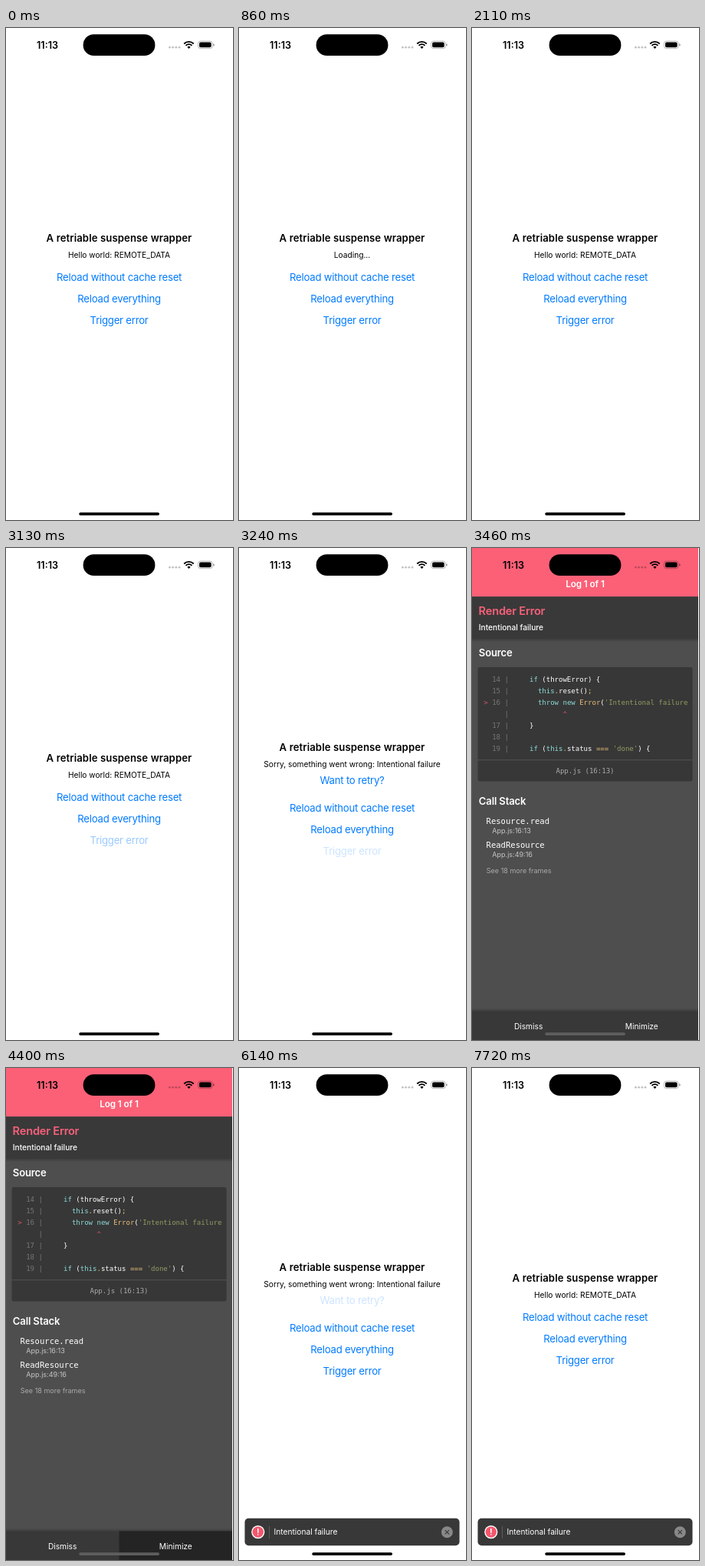
An HTML page that plays this animation: 296x640 px, repeating every 8 s.

```html
<!DOCTYPE html>
<html lang="en">
<head>
<meta charset="utf-8">
<title>Retriable suspense</title>
<style>
  html, body { margin: 0; width: 100%; height: 100%; overflow: hidden; background: #fff; }
  svg { display: block; width: 100vw; height: 100vh; }
  text { font-family: Inter, "Noto Sans", sans-serif; white-space: pre; }
  .mid { text-anchor: middle; }
  .title { font-size: 13.14px; font-weight: 600; letter-spacing: .008em; }
  .body { font-size: 10.2px; }
  .button { font-size: 13.14px; letter-spacing: -.016em; fill: #007aff; }
  .clock { font-size: 12.6px; font-weight: 600; }
  .white { fill: #fff; }
  .heading { font-size: 13.1px; font-weight: 600; letter-spacing: -.012em; }
  .small { font-size: 9.03px; fill: #c4c4c4; }
  .mono { font-family: "DejaVu Sans Mono", monospace; font-size: 9.03px; }
  .frame { font-size: 10.54px; }
  .key { fill: #8cdcd8; }
  .cap, .op { fill: #eac179; }
  .str { fill: #909d62; }
  .gutter { fill: #767676; }
  .mark { fill: #dc5668; }
</style>
</head>
<body>
<svg viewBox="0 0 296 640" preserveAspectRatio="none">
  <defs>
    <linearGradient id="shade" x2="0" y2="1">
      <stop stop-color="#000" stop-opacity=".2"/>
      <stop offset="1" stop-color="#000" stop-opacity="0"/>
    </linearGradient>
    <clipPath id="codeClip"><rect x="8" y="155" width="273" height="120"/></clipPath>
  </defs>

  <g id="app">
    <g id="head">
      <text class="title mid" x="147.5" y="278">A retriable suspense wrapper</text>
      <text class="body mid" id="message" x="147.5" y="298.8"></text>
    </g>
    <text class="button mid" id="retry" x="147.6" y="306.6">Want to retry?</text>
    <g id="buttons">
      <text class="button mid" x="147.6" y="328.7">Reload without cache reset</text>
      <text class="button mid" id="reload" x="147.6" y="356.9">Reload everything</text>
      <text class="button mid" id="trigger" x="147.6" y="385.1">Trigger error</text>
    </g>
    <g id="toast">
      <rect x="7.5" y="585.8" width="280" height="35.4" rx="5" fill="#383838"/>
      <circle cx="24.8" cy="603.6" r="8.6" fill="#fff"/>
      <circle cx="24.8" cy="603.6" r="7.2" fill="#f4566c"/>
      <path d="M24.8 599.6v4.7M24.8 606.9v.1" stroke="#fff" stroke-width="1.6" stroke-linecap="round"/>
      <path d="M39.5 595.8v16" stroke="#666" stroke-width=".8"/>
      <text class="body white" x="45.6" y="607.4">Intentional failure</text>
      <circle cx="271.3" cy="603.7" r="7.5" fill="#888"/>
      <path d="M268.7 601.1l5.2 5.2m0-5.2l-5.2 5.2" stroke="#383838" stroke-width="1.2"/>
    </g>
  </g>

  <g id="log">
    <rect width="295" height="640" fill="#4e4e4e"/>
    <rect width="295" height="63.3" fill="#fb6077"/>
    <text class="mid white" x="147.5" y="51" font-size="11.7" font-weight="600" letter-spacing="-.08">Log 1 of 1</text>
    <rect y="63.3" width="295" height="55" fill="#393939"/>
    <rect y="118.3" width="295" height="4" fill="url(#shade)"/>
    <text x="8.6" y="87.1" font-size="14.6" font-weight="600" letter-spacing="-.2" fill="#f8607a">Render Error</text>
    <text class="body white" x="8.8" y="106.8" font-weight="500">Intentional failure</text>

    <text class="heading white" x="8.8" y="141">Source</text>
    <rect x="7.5" y="155" width="280" height="148.5" rx="2.5" fill="#373737"/>
    <g id="code" clip-path="url(#codeClip)"></g>
    <path d="M7.5 275.8h280" stroke="#5c5c5c" stroke-width=".8"/>
    <text class="mono mid" x="147.5" y="293.2" fill="#aaa">App.js (16:13)</text>

    <text class="heading white" x="8.8" y="334">Call Stack</text>
    <text class="mono frame white" x="18.6" y="358.5">Resource.read</text>
    <text class="small" x="26.3" y="370.6">App.js:16:13</text>
    <text class="mono frame white" x="18.6" y="389.8">ReadResource</text>
    <text class="small" x="26.3" y="402.2">App.js:49:16</text>
    <text class="small" x="18.8" y="422.5" style="fill:#aaa">See 18 more frames</text>

    <rect y="-602.4" width="295" height="4" fill="url(#shade)" transform="scale(1 -1)"/>
    <rect y="602.4" width="295" height="37.6" fill="#383838"/>
    <rect id="pressed" x="147.5" y="602.4" width="147.5" height="37.6" fill="#242424"/>
    <text class="body mid white" x="73.6" y="625.6">Dismiss</text>
    <text class="body mid white" x="221.3" y="625.6">Minimize</text>
  </g>

  <g id="status">
    <text class="clock mid" x="54" y="26.7">11:13</text>
    <rect x="100.6" y="8.3" width="93.8" height="27.8" rx="13.9"/>
    <g fill-opacity=".24">
      <circle cx="213.4" cy="25.2" r="1.4"/><circle cx="217.6" cy="25.2" r="1.4"/>
      <circle cx="221.8" cy="25.2" r="1.4"/><circle cx="226" cy="25.2" r="1.4"/>
    </g>
    <g fill="none" stroke="#000" stroke-width="1.9">
      <path d="M232.2 20.5a8.8 8.8 0 0 1 12.5 0"/>
      <path d="M234.5 22.8a5.6 5.6 0 0 1 7.9 0"/>
    </g>
    <path d="M238.45 26.9l-2.1-2.1a3 3 0 0 1 4.2 0z"/>
    <rect x="250.5" y="17.1" width="18.6" height="9.6" rx="3" fill="none" stroke="#000" stroke-opacity=".35" stroke-width=".8"/>
    <rect x="252" y="18.6" width="15.6" height="6.6" rx="1.8"/>
    <path d="M270.1 20.2a1.7 1.7 0 0 1 0 3.4z" fill-opacity=".4"/>
    <rect id="homeBar" x="95.2" y="630.2" width="104.8" height="3.8" rx="1.9"/>
  </g>
</svg>

<script>
const LOOP = 8000;
const $ = id => document.getElementById(id);
const show = (id, on) => $(id).setAttribute('display', on ? 'inline' : 'none');
const between = (t, from, to) => t >= from && t < to;

// Source listing: gutter, then highlighted code
const listing = [
  ['  14 |', '     if (throwError) {'],
  ['  15 |', '       this.reset();'],
  ['> 16 |', "       throw new Error('Intentional failure');"],
  ['     |', '             ^'],
  ['  17 |', '     }'],
  ['  18 |', ''],
  ['  19 |', "     if (this.status === 'done') {"]
];
const span = (kind, s) => `<tspan class="${kind}">${s}</tspan>`;
const tokens = /('[^']*')|\b(if|this|throw|new)\b|\b(Error)\b|(===|[.;])|(\^)/g;
const kinds = ['str', 'key', 'cap', 'op', 'mark'];
const paint = code => code.replace(tokens, (s, ...groups) =>
  span(kinds[groups.findIndex(g => g !== undefined)], s));

$('code').innerHTML = listing.map(([gutter, code], i) => {
  const lead = gutter[0] === '>' ? span('mark', '&gt;') : ' ';
  return `<text class="mono white" xml:space="preserve" x="15.3" y="${174.2 + i * 15}">` +
    `${lead}${span('gutter', gutter.slice(1))}${paint(code)}</text>`;
}).join('');

// Value of the last [time, value] step reached
const stepAt = (t, steps) => steps.reduce((v, [at, next]) => t >= at ? next : v, 1);
const reloadFade = [[500, .35], [620, .2], [740, .6], [860, 1]];
const triggerFade = [[3130, .4], [3240, .2], [3460, 1]];

function draw(t) {
  const failed = between(t, 3240, 7720);
  const log = between(t, 3460, 6140);
  const shift = failed ? 14.1 : 0;

  $('message').textContent = failed ? 'Sorry, something went wrong: Intentional failure'
    : between(t, 620, 2110) ? 'Loading...' : 'Hello world: REMOTE_DATA';
  $('head').setAttribute('transform', `translate(0 ${-shift})`);
  $('buttons').setAttribute('transform', `translate(0 ${shift})`);
  $('reload').setAttribute('opacity', stepAt(t, reloadFade));
  $('trigger').setAttribute('opacity', stepAt(t, triggerFade));
  $('retry').setAttribute('opacity', t >= 6140 ? .2 : 1);

  show('retry', failed);
  show('toast', t >= 6140);
  show('app', !log);
  show('log', log);
  show('pressed', t >= 4400);
  $('homeBar').setAttribute('fill', log ? '#5e5e5e' : '#000');
}

const start = performance.now();
function tick() {
  draw((performance.now() - start) % LOOP);
  requestAnimationFrame(tick);
}
tick();
</script>
</body>
</html>
```
